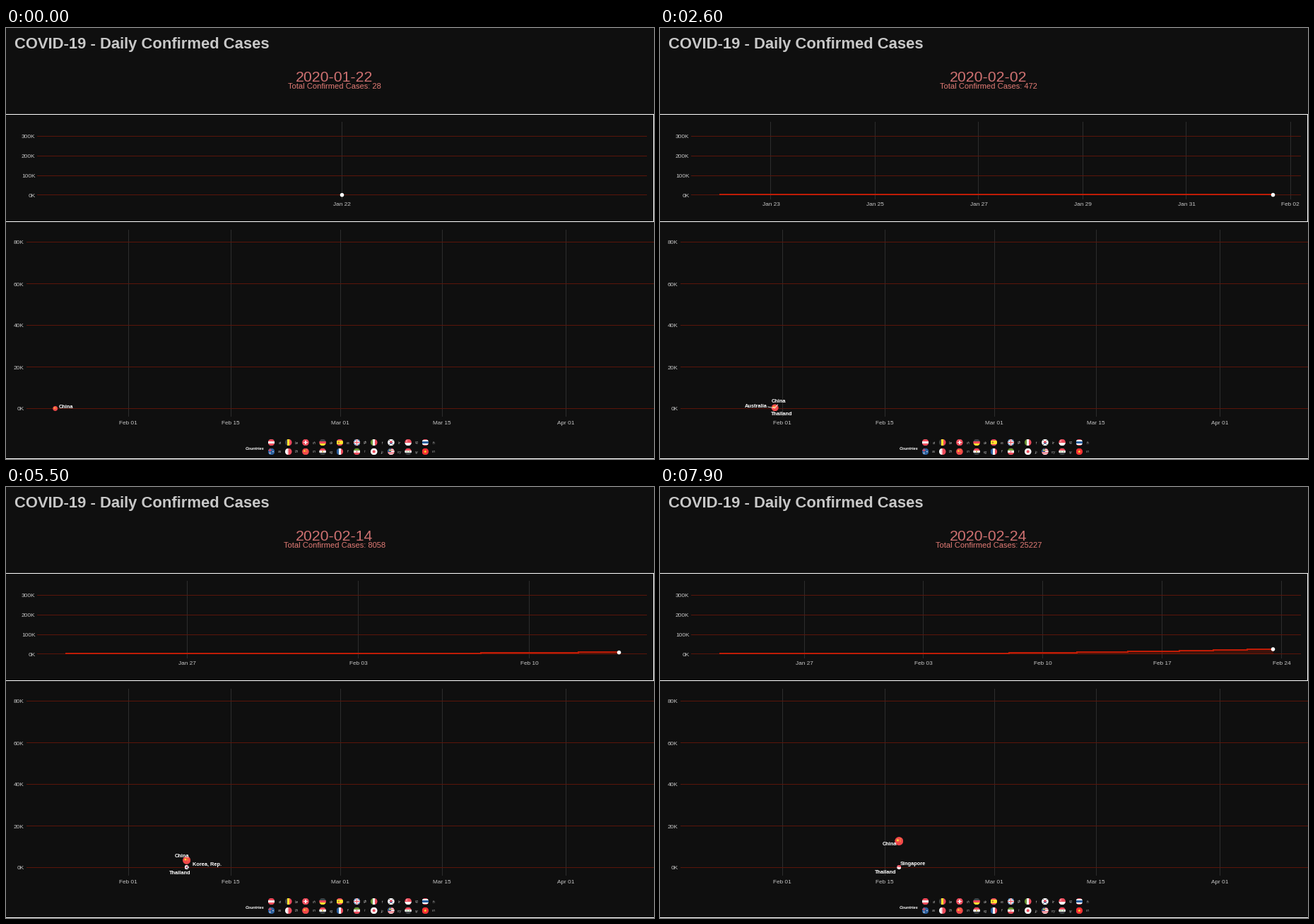
Write a matplotlib script that moves like this. It is 917 by 611 pixels and loops after 8 s.

```python
import numpy as np
import matplotlib.pyplot as plt
from matplotlib.animation import FuncAnimation
from matplotlib.patches import Circle, Polygon, Rectangle
from matplotlib.transforms import Affine2D

W, H, DPI = 917, 611, 64
PT = 72 / DPI  # points per pixel
FRAMES, STEP_MS = 80, 100

BG, GREY, GRID, RUST = "#0f0f0f", "#c6c6c6", "#2d2d2d", "#5a150a"
RED, WHITE, BLUE, YELLOW = "#ed4c5c", "#f9f9f9", "#2a5f9e", "#ffe62e"
GREEN, BLACK, CRIMSON = "#699635", "#3e4347", "#f0474a"

# integer coordinates are pixel centres
fig = plt.figure(figsize=(W / DPI, H / DPI), dpi=DPI, facecolor=BG)
ax = fig.add_axes([0, 0, 1, 1])
ax.set_xlim(-0.5, W - 0.5)
ax.set_ylim(H - 0.5, -0.5)
ax.axis("off")


def text(x, y, s, size, color, ha="center", font="Liberation Sans", **kw):
    return ax.text(x, y, s, fontsize=size * PT, color=color, ha=ha,
                   va="baseline", family=font, **kw)


def strip(x0, y0, x1, y1, color, z):
    """Fill whole pixels from one corner to the other, both included."""
    return ax.add_patch(Rectangle((x0 - 0.5, y0 - 0.5), x1 - x0 + 1, y1 - y0 + 1,
                                  color=color, lw=0, antialiased=False, zorder=z))


def hline(y, x0, x1, color):
    return strip(x0, round(y), x1, round(y), color, 2)


def vline(x, y0, y1, color=GRID):
    return strip(round(x), y0, round(x), y1, color, 1)


# ---- round flags, drawn in a unit disc ----

def bars(colors, across=False):
    n = len(colors)
    parts = []
    for i, c in enumerate(colors):
        a = -1 + 2 * i / n
        xy, w, h = ((a, -1), 2 / n, 2) if across else ((-1, a), 2, 2 / n)
        parts.append(Rectangle(xy, w, h, color=c, lw=0))
    return parts


def disc(x, y, r, c):
    return Circle((x, y), r, color=c, lw=0)


def box(x, y, w, h, c):
    return Rectangle((x, y), w, h, color=c, lw=0)


def cross(w, c, reach=1):
    return [box(-w, -reach, 2 * w, 2 * reach, c), box(-reach, -w, 2 * reach, 2 * w, c)]


def star(x, y, r, c):
    a = np.arange(10) * np.pi / 5 - np.pi / 2
    k = np.where(np.arange(10) % 2, 0.4, 1) * r
    return Polygon(np.column_stack([x + k * np.cos(a), y + k * np.sin(a)]), color=c, lw=0)


def diagonals(w, c):
    return [Polygon([(-1 - w, -s), (-1 + w, -s), (1 + w, s), (1 - w, s)], color=c, lw=0)
            for s in (1, -1)]


FLAGS = {
    "at": lambda: bars([RED, WHITE, RED]),
    "au": lambda: bars([BLUE]) + [box(-1, -0.5, 1, 0.16, RED), box(-0.5, -1, 0.16, 1, RED),
                                  star(-0.4, 0.45, 0.3, WHITE), star(0.5, 0, 0.25, WHITE)],
    "be": lambda: bars([BLACK, YELLOW, RED], True),
    "bh": lambda: bars([WHITE, RED], True) + [
        Polygon([(0, y), (-0.3, y + 0.2), (0, y + 0.4)], color=RED, lw=0)
        for y in np.arange(-1, 1, 0.4)],
    "ch": lambda: bars([RED]) + cross(0.17, WHITE, 0.55),
    "cn": lambda: bars([CRIMSON]) + [star(-0.3, -0.2, 0.42, YELLOW)] + [
        star(0.3, y, 0.14, YELLOW) for y in (-0.6, -0.25, 0.1)],
    "de": lambda: bars([BLACK, RED, YELLOW]),
    "eg": lambda: bars([RED, WHITE, BLACK]) + [disc(0, 0, 0.22, "#c9a227")],
    "es": lambda: bars([RED, YELLOW, YELLOW, RED]) + [disc(-0.3, 0, 0.25, "#c8802c")],
    "fr": lambda: bars([BLUE, WHITE, RED], True),
    "gb": lambda: bars([BLUE]) + diagonals(0.13, WHITE) + cross(0.26, WHITE) + cross(0.16, RED),
    "ir": lambda: bars([GREEN, WHITE, RED]) + [disc(0, 0, 0.2, RED)],
    "it": lambda: bars([GREEN, WHITE, RED], True),
    "jp": lambda: bars([WHITE]) + [disc(0, 0, 0.42, RED)],
    "kr": lambda: bars([WHITE]) + [disc(0, 0.08, 0.42, BLUE), disc(0, -0.12, 0.36, RED)] + [
        box(x - 0.15, y - 0.13, 0.3, 0.26, BLACK) for x in (-0.55, 0.55) for y in (-0.55, 0.55)],
    "my": lambda: bars([RED, WHITE] * 4) + [box(-1, -1, 1.1, 1, BLUE),
                                            disc(-0.3, -0.4, 0.25, YELLOW)],
    "sg": lambda: bars([RED, WHITE]) + [disc(-0.3, -0.4, 0.28, WHITE),
                                        disc(-0.18, -0.4, 0.25, RED)],
    "sy": lambda: bars([RED, WHITE, BLACK]) + [star(-0.35, 0, 0.25, GREEN),
                                               star(0.35, 0, 0.25, GREEN)],
    "th": lambda: bars([RED, WHITE, BLUE, BLUE, WHITE, RED]),
    "vn": lambda: bars(["#f42f34"]) + [star(0, 0, 0.5, YELLOW)],
}


def flag(code, x, y, r, z=5):
    place = Affine2D().scale(r).translate(x, y) + ax.transData
    rim = Circle((0, 0), 1, transform=place)
    parts = FLAGS[code]()
    for p in parts:
        p.set_transform(place)
        p.set_zorder(z)
        ax.add_artist(p)
        p.set_clip_path(rim)
    return parts


# ---- static scene ----

text(12, 28.5, "COVID-19 - Daily Confirmed Cases", 22, "#c8c8c8", "left", weight="bold")
for y in (122, 274, H - 1):
    hline(y, 0, W - 1, "white")
vline(W - 1, 122, 274, "white")

TOP0, TOP_K = 236.5, 27.8 / 100e3
LOW0, LOW_K = 539, 59 / 20e3
for k in range(4):
    y = TOP0 - k * 27.8
    hline(y, 44, 906, RUST)
    text(41, round(y) + 3, f"{k * 100}K", 8.2, GREY, "right")
for k in range(5):
    y = LOW0 - 59 * k
    hline(y, 29, W - 1, RUST)
    text(25, y + 3, f"{k * 20}K", 8.2, GREY, "right")
for x, s in [(173, "Feb 01"), (318, "Feb 15"), (473, "Mar 01"),
             (617, "Mar 15"), (792, "Apr 01")]:
    vline(x, 286, 550)
    text(x - 0.5, 562, s, 8.2, GREY)

text(338, 597, "Countries", 5.8, "white", "left", weight="bold", style="italic")
for i, code in enumerate(sorted(FLAGS)):
    cx, cy = 375 + 24.2 * (i // 2), 587 + 13 * (i % 2)
    flag(code, cx, cy, 4.8)
    text(cx + 12, cy + 2, code, 4.6, "#a8a8a8", style="italic")


# ---- data ----

def total(day):
    roots = np.sqrt([28, 61, 472, 2616, 8058, 14352, 25227])
    return np.interp(day, [0, 5, 11, 17, 23, 27, 33], roots) ** 2


def china(day):
    return np.interp(day, [0, 4, 9, 13, 16, 18, 21, 24, 26],
                     [30, 60, 400, 1000, 2300, 3500, 5400, 9300, 12700])


KEYS = np.round(2.424 * np.arange(36))  # step at which each day is reached


def day_name(d):
    return ("Jan", 22 + d) if d < 10 else ("Feb", d - 9)


def ticks(t):
    if t <= 6:
        days = range(0, 8)
    elif t < 12:
        days = range(1, 40, 2)
    else:
        days = range(5, 40, 7)
    return [d for d in days if d <= 1.05 * t]


# first day: {name: (dx, dy, optional leader start)}; China is relative to its dot
LABELS = {
    0: {"China": (15.5, -3.5)},
    1: {"China": (-15, -3)},
    3: {"China": (0, -4.5), "Thailand": (0, 7)},
    6: {"China": (-4, -9), "Thailand": (-2, 7), "Australia": (27, 0, 10, 0)},
    8: {"China": (5.5, -10, 4, -4.5), "Thailand": (9.5, 7), "Australia": (-26.5, -4, -10, -2)},
    12: {"China": (4, -9), "Thailand": (6, 7), "Australia": (-26, -1, -10, 0)},
    13: {"China": (-4, -9), "Thailand": (-11, 7), "Australia": (26, 0, 11, 0)},
    15: {"China": (-5, -8), "Thailand": (-16, 7), "Korea, Rep.": (28, -4)},
    18: {"China": (-6.5, -6.5), "Thailand": (-9.5, 7), "Korea, Rep.": (28.5, -4.5)},
    19: {"China": (14, -5), "Thailand": (10, 7), "Korea, Rep.": (-32, -4)},
    21: {"China": (14, -3), "Thailand": (12.5, 7), "Singapore": (-18.5, -5.5)},
    24: {"China": (-13, 3.5), "Thailand": (-19, 6), "Singapore": (20, -5.5)},
}
CODES = {"China": "cn", "Thailand": "th", "Australia": "au",
         "Korea, Rep.": "kr", "Singapore": "sg"}

date = text(464.5, 75, "", 21.3, "#cd7070")
count = text(464.5, 85.5, "", 11.1, "#e07a74")
live = []


def draw_top(t):
    def px(d):
        return 83 + 784 * d / t if t else 475

    for d in ticks(t):
        live.append(vline(px(d), 133, 242))
        live.append(text(px(d), 252, "%s %02d" % day_name(d), 8.2, GREY))
    if t:
        days = np.append(np.arange(np.ceil(t)), t)
        y = 235.5 - np.floor(total(days) * TOP_K + 0.4)
        live.append(ax.fill_between(px(days), y, TOP0, step="post", lw=0,
                                    color="#c81e00", alpha=0.25, zorder=3))
        live.extend(ax.plot(px(days), y, color="#c01c06", lw=2 * PT, zorder=4,
                            drawstyle="steps-post", antialiased=False,
                            solid_capstyle="butt"))
    live.append(ax.add_patch(Circle((px(t), TOP0 - 0.3 - total(t) * TOP_K), 2.8,
                                    color="white", lw=0, zorder=6)))


def draw_low(day):
    x = 69.2 + 10.33 * day
    labels = LABELS[max(d for d in LABELS if d <= day)]
    for name, (dx, dy, *lead) in labels.items():
        home = name == "China"
        y = LOW0 - china(day) * LOW_K if home else LOW0 - 0.5
        r = 3.5 + 2.5 * np.sqrt(day / 26) if home else 3
        live.extend(flag(CODES[name], x, y, r, 7 if home else 6))
        if lead:
            live.extend(ax.plot([x + lead[0], x], [y + lead[1], y], color="white",
                                lw=0.8 * PT, zorder=8))
        live.append(text(x + dx, y + dy + 2.7, name, 7.4, "white", weight="bold", zorder=9))


def update(i):
    while live:
        live.pop().remove()
    d = int(np.searchsorted(KEYS, i, side="right")) - 1
    t = d + (i - KEYS[d]) / (KEYS[d + 1] - KEYS[d])
    shown = int(t + 0.5)
    month, dom = day_name(shown)
    date.set_text(f"2020-{'01' if month == 'Jan' else '02'}-{dom:02d}")
    count.set_text(f"Total Confirmed Cases: {round(float(total(shown)))}")
    draw_top(t)
    draw_low((i + 1) // 3)
    return []


anim = FuncAnimation(fig, update, frames=FRAMES, interval=STEP_MS, init_func=lambda: [],
                     repeat=True, repeat_delay=0, blit=False)
plt.show()
```
